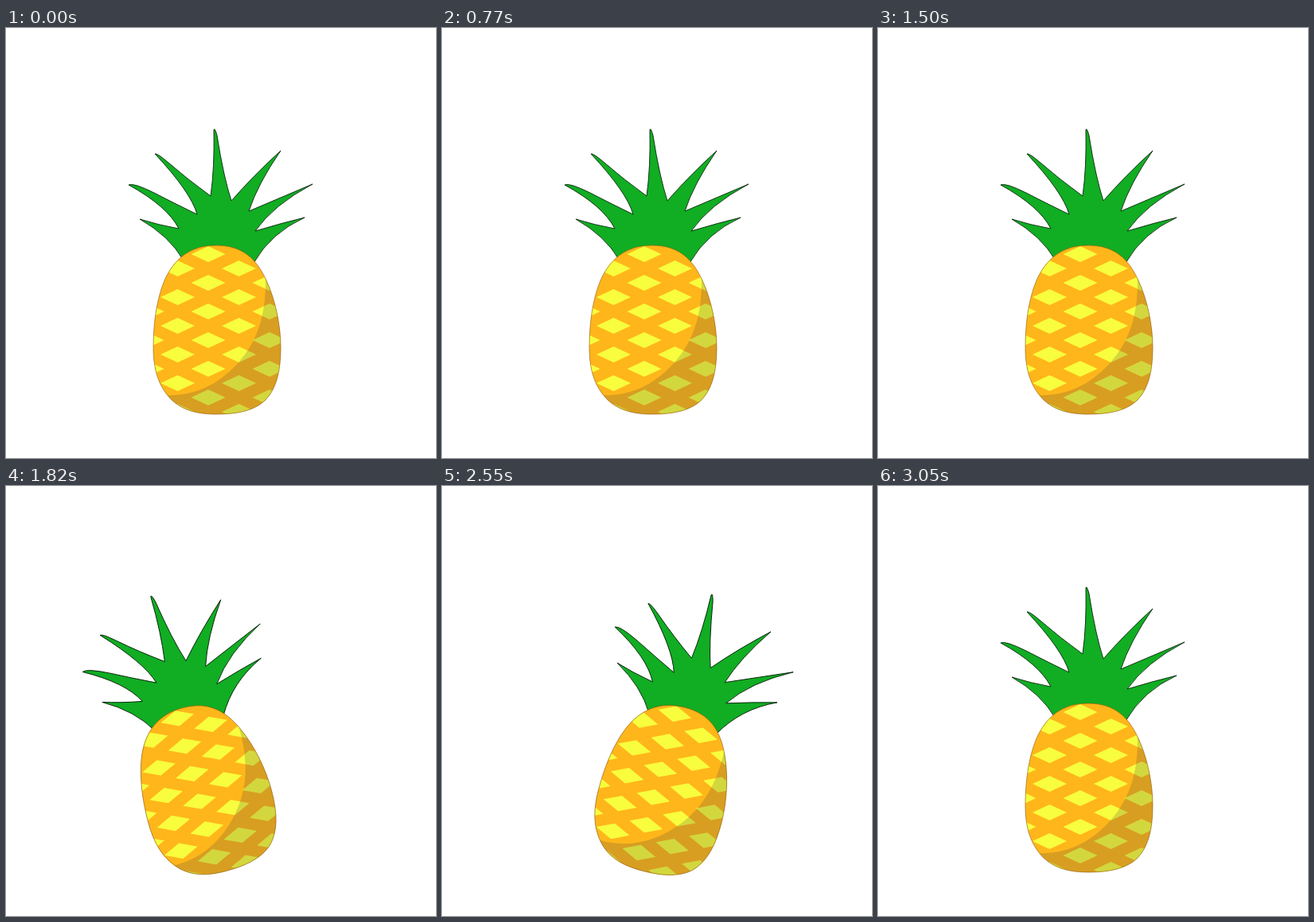
An HTML page that plays this animation: 540 by 540 pixels, repeating every 3.1 s.

```html
<!DOCTYPE html>
<html lang="en">
<head>
<meta charset="utf-8">
<title>Swaying pineapple</title>
<style>
  html, body { margin: 0; width: 100%; height: 100%; overflow: hidden; background: #fff; }
  svg { display: block; width: 100vw; height: 100vh; }
</style>
</head>
<body>
<svg viewBox="0 0 540 540">
  <defs>
    <path id="shape" d="M264 273 C298 273 315 291 327 317 C339 343 345 375 345 401
      C345 430 340 453 325 468 C310 482 286 485 264 485 C242 485 223 481 208 467
      C191 450 185 428 185 401 C185 371 189 341 199 317 C211 290 231 273 264 273Z"/>
    <clipPath id="body"><use href="#shape"/></clipPath>
  </defs>
  <g id="fruit">
    <path fill="#11ad23" stroke="#06240a" stroke-width="0.9" stroke-linejoin="round"
      d="M223 292 Q205 261 168 240 Q190 247 217 252 Q203 224 154 197 Q160 194 186 207
      Q213 221 240 234 Q232 206 187 158 Q190 157 205 170 Q228 190 257 211
      Q262 175 261 128 Q262 124 265 135 Q273 186 283 217 Q310 186 345 154
      Q316 196 305 230 Q345 213 385 196 Q336 222 313 255 Q346 245 375 238
      Q333 257 311 295Z"/>
    <use href="#shape" fill="#ffb61a"/>
    <g clip-path="url(#body)">
      <path id="diamonds" fill="#f8fd3e"/>
      <path fill="#3c3c3c" fill-opacity="0.2"
        d="M325 300 C329 350 319 384 300 410 C273 446 238 463 200 461 V500 H360 V300Z"/>
    </g>
    <use href="#shape" fill="none" stroke="#8a5a08" stroke-opacity="0.75" stroke-width="0.8"/>
  </g>
</svg>
<script>
  const LOOP = 3100, FPS = 22;
  const PIVOT = "264.5 436";
  const fruit = document.getElementById("fruit");

  // Each swing: peak step, half width in steps, angle in degrees
  const swings = [
    [6.4, 6.3, -14],
    [24.1, 5.3, 21.6],
    [40.3, 6.3, -15],
    [58.05, 5.15, 22]
  ];

  let d = "";
  for (let col = -2; col <= 2; col++) {
    for (let row = -1; row < 6; row++) {
      const x = 254 + 38.5 * col;
      const y = 284 + 36 * row + (col % 2 ? 18 : 0);
      d += `M${x - 21.5} ${y}L${x} ${y - 10}L${x + 21.5} ${y}L${x} ${y + 10}Z`;
    }
  }
  document.getElementById("diamonds").setAttribute("d", d);

  function tilt(step) {
    return swings.reduce((sum, [peak, half, angle]) => {
      const u = (step - peak) / half;
      return Math.abs(u) < 1 ? sum + angle * (1 + Math.cos(Math.PI * u)) / 2 : sum;
    }, 0);
  }

  // Steps fall on a 10 ms clock
  function draw() {
    const tick = Math.floor((performance.now() % LOOP) / 10);
    const step = Math.floor((tick + 0.5) * FPS / 100);
    fruit.setAttribute("transform", `rotate(${tilt(step).toFixed(3)} ${PIVOT})`);
    requestAnimationFrame(draw);
  }
  draw();
</script>
</body>
</html>
```
